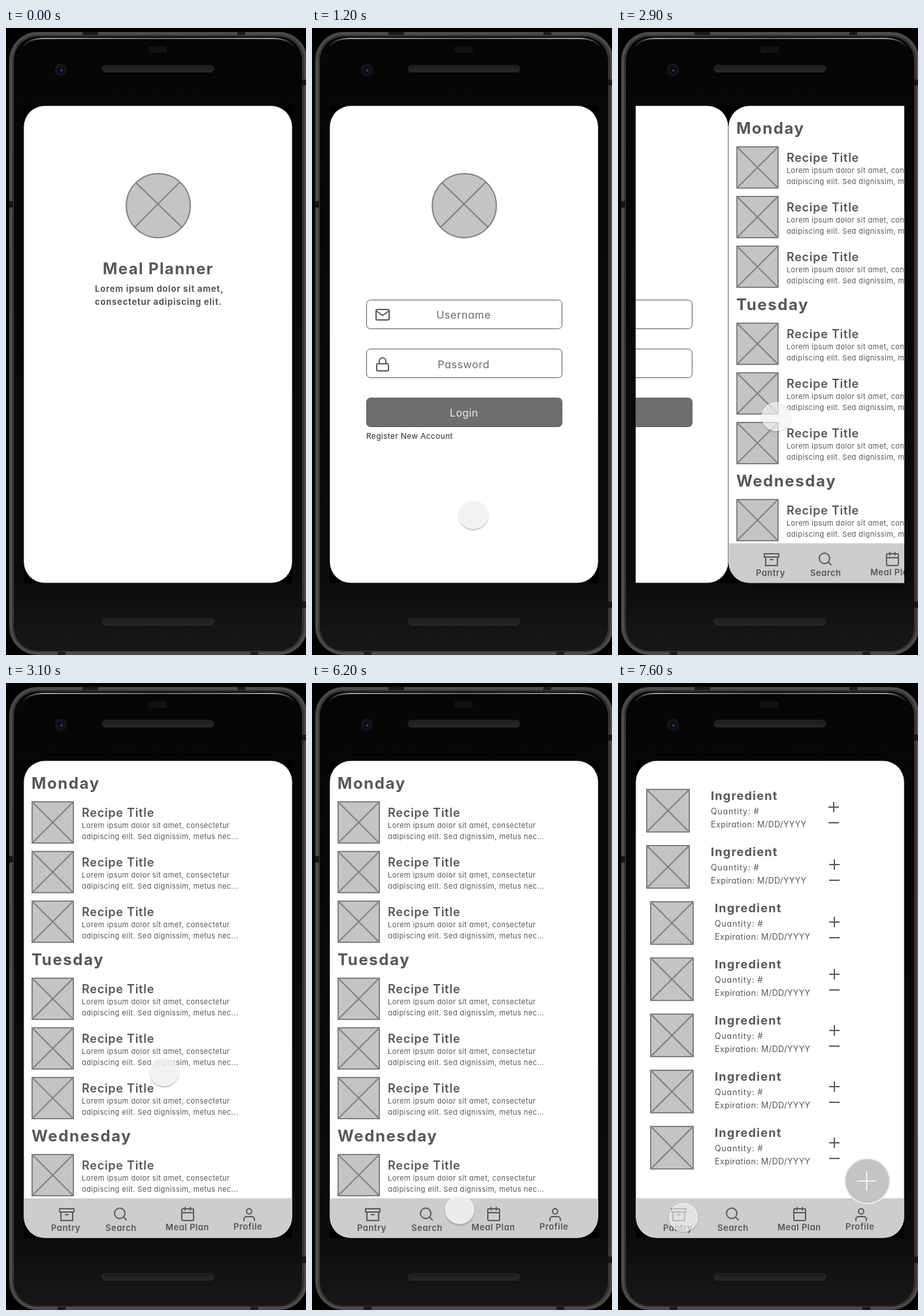
Recreate the animation shown at these times as an HTML page. Size 459 by 960 pixels, loop 8 s.

```html
<!DOCTYPE html>
<html lang="en">
<head>
<meta charset="utf-8">
<title>Meal planner prototype</title>
<style>
  html, body { margin: 0; width: 100%; height: 100%; overflow: hidden; background: #000; }
  svg { position: absolute; left: 0; top: 0; display: block; }

  text { font-family: Inter, "Open Sans", sans-serif; fill: #575757; white-space: pre; }
  .brand { font-size: 24px; font-weight: 700; letter-spacing: 1.4px; }
  .tagline { font-size: 13px; font-weight: 700; letter-spacing: .78px; }
  .day { font-size: 24px; font-weight: 700; letter-spacing: 1.6px; }
  .recipe { font-size: 18px; font-weight: 600; letter-spacing: .75px; }
  .item { font-size: 18px; font-weight: 700; letter-spacing: 1.25px; }
  .body, .meta, .amount, .field, .link, .tab { font-feature-settings: "cv11"; }
  .body { font-size: 11px; letter-spacing: .42px; }
  .meta { font-size: 12.5px; letter-spacing: .4px; }
  .amount { font-size: 12.5px; letter-spacing: .8px; }
  .field { font-size: 16px; letter-spacing: .6px; text-anchor: middle; fill: #6a6a6a; }
  .login { fill: #eee; letter-spacing: .3px; }
  .link { font-size: 12px; letter-spacing: .32px; fill: #2c2c2c; }
  .tab { font-size: 13px; font-weight: 600; letter-spacing: .5px; }

  .image { fill: #c4c4c4; stroke: #828282; stroke-width: 2; }
  .icon { fill: none; stroke: #5c5c5c; stroke-width: 2; stroke-linecap: round; stroke-linejoin: round; }
  .box { fill: #fff; stroke: #5a5a5a; }
  .sign { fill: none; stroke: #5c5c5c; stroke-width: 2; }

  #strip { animation: slide 8s infinite; }
  #arrow { animation: arrow 8s step-end infinite; }
  #pointer {
    position: absolute; left: -22px; top: -22px; width: 44px; height: 44px;
    box-sizing: border-box; border: 1px solid rgba(255, 255, 255, .75); border-radius: 50%;
    animation: move 8s ease-in-out infinite, press 8s ease-out infinite, show 8s step-end infinite;
  }

  @keyframes slide {
    0%, 7% { transform: translateX(0); animation-timing-function: ease-out; }
    10.75%, 34.4775% { transform: translateX(-411px); animation-timing-function: ease-out; }
    38.2275%, 90.875% { transform: translateX(-822px); animation-timing-function: ease-out; }
    94.625%, 100% { transform: translateX(-1233px); }
  }
  @keyframes move {
    0%, 12.4% { transform: translate(250px, 847px); }
    15%, 19.5% { transform: translate(247px, 745px); }
    23.75%, 59.5% { transform: translate(242px, 595px); }
    60% { transform: translate(240px, 602px); }
    70%, 70.7% { transform: translate(224px, 790px); }
    72.5%, 77% { transform: translate(227px, 806px); animation-timing-function: ease-in; }
    81.5% { transform: translate(168px, 825px); animation-timing-function: ease-out; }
    86.25%, 100% { transform: translate(100px, 818px); }
  }
  @keyframes press {
    0%, 31.9% { background: rgba(241, 241, 241, .88); box-shadow: 0 2px 3px rgba(0, 0, 0, .27); }
    32%, 34.4% { background: rgba(245, 245, 245, .38); box-shadow: 0 2px 3px rgba(0, 0, 0, 0); }
    38.5%, 89.5% { background: rgba(241, 241, 241, .88); box-shadow: 0 2px 3px rgba(0, 0, 0, .27); }
    90.9%, 92% { background: rgba(245, 245, 245, .38); box-shadow: 0 2px 3px rgba(0, 0, 0, 0); }
    95%, 100% { background: rgba(241, 241, 241, .62); box-shadow: 0 1px 3px rgba(0, 0, 0, .22); }
  }
  @keyframes show {
    0% { opacity: 0; }
    12.4% { opacity: 1; }
    89.5% { opacity: 0; }
    90.9%, 100% { opacity: 1; }
  }
  @keyframes arrow {
    0% { opacity: 0; }
    89.5% { opacity: 1; }
    90.9%, 100% { opacity: 0; }
  }
</style>
</head>
<body>
<svg width="459" height="960" viewBox="0 0 459 960">
  <defs>
    <linearGradient id="glass" x2="0" y2="1">
      <stop offset="0" stop-color="#050505"/>
      <stop offset=".88" stop-color="#0b0b0b"/>
      <stop offset="1" stop-color="#181818"/>
    </linearGradient>
    <linearGradient id="shine">
      <stop offset="0" stop-color="#777" stop-opacity=".2"/>
      <stop offset=".07" stop-color="#999"/>
      <stop offset=".5" stop-color="#666"/>
      <stop offset=".93" stop-color="#999"/>
      <stop offset="1" stop-color="#777" stop-opacity=".2"/>
    </linearGradient>
    <linearGradient id="slot" x2="0" y2="1">
      <stop offset="0" stop-color="#1b1b1b"/>
      <stop offset="1" stop-color="#282828"/>
    </linearGradient>
    <clipPath id="screen"><rect x="27" y="119" width="411" height="731"/></clipPath>
    <clipPath id="page"><rect x="27.3" y="119.2" width="410.4" height="730.4" rx="32"/></clipPath>
  </defs>

  <g id="phone">
    <rect x="6.5" y="7.5" width="453" height="951" rx="42" fill="#343434" stroke="#4a4a4a" stroke-width="3"/>
    <rect x="8.5" y="9.5" width="449" height="947" rx="40" fill="none" stroke="#5a5a5a"/>
    <rect x="11.5" y="12.5" width="442" height="942" rx="37" fill="url(#glass)" stroke="#3b3b3b"/>
    <path d="M27 28Q35 16 58 16H408Q431 16 440 28" fill="none" stroke="url(#shine)" stroke-width="1.8"/>
    <path d="M117 8.5h24M354 8.5h12M79 957.5h12M374 957.5h12" stroke="#1c1c1c" stroke-width="5"/>
    <path d="M8 265v10M456 79v9M456 878v10" stroke="#171717" stroke-width="6"/>
    <rect x="218" y="28" width="28" height="10" rx="2" fill="#121212"/>
    <circle cx="84" cy="64" r="9.5" fill="#141518"/>
    <circle cx="84" cy="64" r="5.5" fill="#0a0d1d"/>
    <circle cx="84.8" cy="64.8" r="1.6" fill="#34509a"/>
    <rect x="147" y="57" width="171" height="10.5" rx="5" fill="url(#slot)" stroke="#2b2b2b"/>
    <rect x="147" y="904" width="171" height="10.5" rx="5" fill="url(#slot)" stroke="#2b2b2b"/>
    <rect x="27" y="119" width="411" height="731"/>
  </g>

  <g clip-path="url(#screen)"><g id="strip"></g></g>
  <path id="arrow" d="M99.5 815.5v17l3.9-3.6 3.3 7.6 2.8-1.2-3.3-7.4h5z" fill="#fff" stroke="#111"/>
</svg>
<div id="pointer"></div>

<script>
const text = (x, y, style, content) => `<text x="${x}" y="${y}" class="${style}">${content}</text>`;
const icon = (x, y, d) => `<path class="icon" transform="translate(${x} ${y})" d="${d}"/>`;
const image = (x, y, size) => {
  const s = size - 2;
  return `<path class="image" d="M${x + 1} ${y + 1}h${s}v${s}h${-s}zl${s} ${s}m0 ${-s}l${-s} ${s}"/>`;
};
const logo = `<circle class="image" cx="233" cy="272" r="49"/>
  <path class="image" d="M199 237L269 305M266 236L197 305"/>`;

const tabs = `<rect x="27" y="789" width="411" height="61" fill="#cdcdcd"/>`
  + icon(81, 802, "M21 8v13H3V8M1 3h22v5H1zM10 12h4")
  + icon(163, 801, "M19 11a8 8 0 1 1-16 0a8 8 0 1 1 16 0M21 21l-4.35-4.35")
  + icon(266, 801, "M5 4h14a2 2 0 0 1 2 2v14a2 2 0 0 1-2 2H5a2 2 0 0 1-2-2V6a2 2 0 0 1 2-2zM16 2v4M8 2v4M3 10h18")
  + icon(360, 802, "M20 21v-2a4 4 0 0 0-4-4H8a4 4 0 0 0-4 4v2M16 7a4 4 0 1 1-8 0a4 4 0 1 1 8 0")
  + text(69, 839, "tab", "Pantry") + text(152, 839, "tab", "Search")
  + text(244, 838, "tab", "Meal Plan") + text(348, 837, "tab", "Profile");

const splash = logo
  + text(148, 377, "brand", "Meal Planner")
  + text(136, 404, "tagline", "Lorem ipsum dolor sit amet,")
  + text(136, 424, "tagline", "consectetur adipiscing elit.");

const field = (y, fill) =>
  `<rect class="box" x="83.5" y="${y + .5}" width="299" height="44" rx="6" style="fill:${fill}"/>`;
const login = logo
  + field(416, "#fff") + field(491, "#fff") + field(566, "#6e6e6e")
  + icon(96, 427, "M4 4h16a2 2 0 0 1 2 2v12a2 2 0 0 1-2 2H4a2 2 0 0 1-2-2V6a2 2 0 0 1 2-2zM22 6l-10 7L2 6")
  + icon(96, 503, "M5 11h14a2 2 0 0 1 2 2v7a2 2 0 0 1-2 2H5a2 2 0 0 1-2-2v-7a2 2 0 0 1 2-2zM7 11V7a5 5 0 0 1 10 0v4")
  + text(232, 445, "field", "Username")
  + text(232, 521, "field", "Password")
  + text(232.5, 595, "field login", "Login")
  + text(83, 629, "link", "Register New Account");

const recipe = y => image(39, y, 65)
  + text(116, y + 24, "recipe", "Recipe Title")
  + text(116, y + 41, "body", "Lorem ipsum dolor sit amet, consectetur")
  + text(116, y + 58, "body", "adipiscing elit. Sed dignissim, metus nec...");
const plan = ["Monday", "Tuesday", "Wednesday"].map((day, i) => {
  const top = 162 + i * 270;
  const rows = i < 2 ? [19, 95, 171] : [19];
  return text(39, top, "day", day) + rows.map(dy => recipe(top + dy)).join("");
}).join("") + tabs;

const plusY = [190, 278, 366, 446, 532, 618, 704];
const pantry = plusY.map((py, i) => {
  const x = i < 2 ? 43 : 49, y = 162 + i * 86, px = i ? 331 : 330;
  return image(x, y, 67)
    + text(x + 99, y + 17, "item", "Ingredient")
    + text(x + 99, y + 39, "amount", "Quantity: #")
    + text(x + 99, y + 59, "meta", "Expiration: M/DD/YYYY")
    + `<path class="sign" d="M${px - 8} ${py}h16m-8-8v16M${px - 8} ${py + 24}h16"/>`;
}).join("") + tabs
  + `<circle cx="381.5" cy="762.5" r="34.5" fill="#c4c4c4" stroke="#f2f2f2" stroke-width="2"/>
     <path d="M365.5 762.5h30m-15-15v30" stroke="#fff" stroke-width="1.6"/>`;

document.getElementById("strip").innerHTML = [splash, login, plan, pantry].map((content, i) =>
  `<g transform="translate(${i * 411} 0)" clip-path="url(#page)">
     <rect x="27" y="119" width="411" height="731" fill="#fff"/>${content}</g>`).join("");

// Play the keyframes at ten pictures per second; the lead absorbs display latency.
const STEP = 100, LOOP = 8000, LEAD = 20;
const animations = document.getAnimations();
animations.forEach(a => a.pause());
function tick() {
  const time = Math.floor((performance.now() + LEAD) % LOOP / STEP) * STEP;
  animations.forEach(a => { a.currentTime = time; });
  requestAnimationFrame(tick);
}
tick();
</script>
</body>
</html>
```
